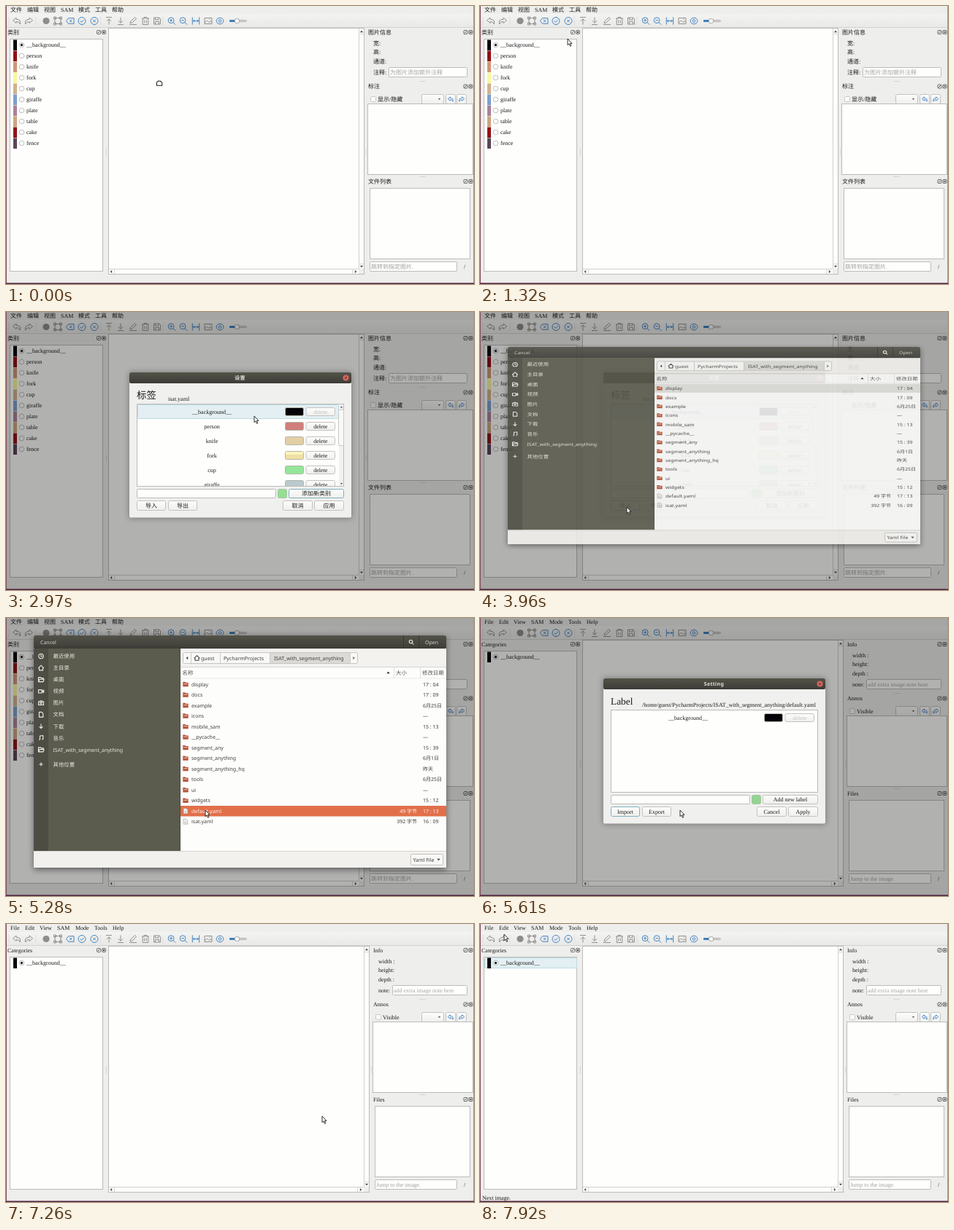
Recreate the animation shown at these times as an HTML page. Size 641x382 px, loop 8000 ms.

```html
<!DOCTYPE html>
<html lang="en">
<head>
<meta charset="utf-8">
<title>Label settings</title>
<style>
  html, body { margin: 0; width: 100%; height: 100%; overflow: hidden; background: #eeeeec; }
  svg { display: block; width: 100vw; height: 100vh; }
  text { font: 8px "Liberation Serif", "Noto Sans CJK SC", "Noto Sans CJK JP", serif; white-space: pre; text-rendering: geometricPrecision; }
  .sans text { font: 7px "Noto Sans", "Noto Sans CJK SC", "Noto Sans CJK JP", sans-serif; }
</style>
</head>
<body>
<svg id="stage" viewBox="0 0 641 382"></svg>
<script>
const STEP = 330, LOOP = 8000;
const INK = '#1c1c1c', LINE = '#bcbcba', GRAY = '#8d8d8b', BLUE = '#3a7fc0';

// Pointer tip for every step.
const POINTER = [
  [210, 106], [210, 106], [210, 106], [210, 106], [120, 45], [14, 5], [16, 40], [18, 72],
  [18, 72], [340, 143], [226, 255], [201, 268], [201, 268], [201, 268], [287, 278], [274, 264],
  [273, 264], [274, 264], [274, 178], [365, 178], [425, 261], [433, 264], [433, 264], [92, 54], [33, 14]
];
const HAND_UNTIL = 4, SETTINGS = [8, 22], CHOOSER = [12, 17], ENGLISH_FROM = 17;
const within = (n, [from, to]) => n >= from && n < to;

const ZH = {
  menu: [['文件', 6], ['编辑', 29], ['视图', 52], ['SAM', 75], ['模式', 99], ['工具', 122], ['帮助', 145]],
  docks: ['类别', '图片信息', '标注', '文件列表'],
  info: ['宽:', '高:', '通道:', '注释:'], note: '为图片添加额外注释', noteX: 524,
  visible: '显示/隐藏', jump: '跳转到指定图片.', shift: 0,
  title: '设置', label: '标签', path: 'isat.yaml', add: '添加新类别',
  buttons: ['导入', '导出', '取消', '应用']
};
const EN = {
  menu: [['File', 6], ['Edit', 26], ['View', 46], ['SAM', 70], ['Mode', 95], ['Tools', 121], ['Help', 146]],
  docks: ['Categories', 'Info', 'Annos', 'Files'],
  info: ['width :', 'height:', 'depth :', 'note:'], note: 'add extra image note here', noteX: 529,
  visible: 'Visible', jump: 'Jump to the image.', shift: 7,
  title: 'Setting', label: 'Label',
  path: '/home/guest/PycharmProjects/ISAT_with_segment_anything/default.yaml', add: 'Add new label',
  buttons: ['Import', 'Export', 'Cancel', 'Apply']
};
const CATEGORIES = [
  ['__background__', '#08060a', '#050308'], ['person', '#8f1016', '#d07f7b'],
  ['knife', '#cf9675', '#e3cfa5'], ['fork', '#f8f89c', '#f0e0a4'],
  ['cup', '#d0b18c', '#93e69a'], ['giraffe', '#7ba0cb', '#b9c9cd'],
  ['plate', '#a98299'], ['table', '#cba57c'], ['cake', '#8f1418'], ['fence', '#5b4557']
];
const PLACES = ['最近使用', '主目录', '桌面', '视频', '图片', '文档', '下载', '音乐', 'ISAT_with_segment_anything', '其他位置'];
const FILES = [
  ['display', '17 : 04'], ['docs', '17 : 09'], ['example', '6月25日'], ['icons', '—'], ['mobile_sam', '15 : 13'],
  ['__pycache__', '—'], ['segment_any', '15 : 39'], ['segment_anything', '6月1日'], ['segment_anything_hq', '昨天'],
  ['tools', '6月25日'], ['ui', '—'], ['widgets', '15 : 12'],
  ['default.yaml', '17 : 13', '49 字节'], ['isat.yaml', '16 : 09', '392 字节']
];

const fill = (x, y, w, h, color, r = 0) =>
  `<rect x="${x}" y="${y}" width="${w}" height="${h}" rx="${r}" fill="${color}"/>`;
const box = (x1, y1, x2, y2, color = '#fefefd', line = LINE, r = 0) =>
  `<rect x="${x1 + .5}" y="${y1 + .5}" width="${x2 - x1 - 1}" height="${y2 - y1 - 1}" rx="${r}" fill="${color}" stroke="${line}"/>`;
const text = (x, y, s, color = INK, anchor = 'start', style = '') =>
  `<text x="${x}" y="${y + 2.7}" fill="${color}" text-anchor="${anchor}" style="${style}">${s}</text>`;
const icon = (d, x, y, color = GRAY, w = 1, inside = 'none', scale = '1') =>
  `<path d="${d}" transform="translate(${x} ${y}) scale(${scale})" fill="${inside}" stroke="${color}" stroke-width="${w}" stroke-linejoin="round"/>`;
const solid = (d, x, y, color, scale) => icon(d, x, y, 'none', 0, color, scale);
const button = (x1, y1, x2, y2, s, color = INK, line = '#c2c2c0') =>
  box(x1, y1, x2, y2, 'url(#button)', line, 2) + text((x1 + x2) / 2, (y1 + y2) / 2, s, color, 'middle');
const ring = r => `M${-r} 0a${r} ${r} 0 1 0 ${2 * r} 0a${r} ${r} 0 1 0 ${-2 * r} 0`;
const TRI = { up: 'M-2.2 1.2L0-1.4L2.2 1.2Z', down: 'M-2.2-1.2L0 1.4L2.2-1.2Z', left: 'M1.2-2.2L-1.4 0L1.2 2.2Z', right: 'M-1.2-2.2L1.4 0L-1.2 2.2Z' };

const ARROW = 'M-1-4.5L-5.5-.8L-1 3V1Q3.5 .8 4.2 4.5Q6.5-2-1-2.2Z';
const LENS = 'M-4.8-.8a3.9 3.9 0 1 0 7.8 0a3.9 3.9 0 1 0-7.8 0M2 2L5.2 5.2M-2.8-.8H1';
const TOOLS = [
  [15, ARROW], [31, ARROW, GRAY, '-1 1'],
  [71, 'M-4-4H4V4H-4ZM-5.5-5.5h3v3h-3zM2.5-5.5h3v3h-3zM-5.5 2.5h3v3h-3zM2.5 2.5h3v3h-3z'],
  [88, 'M-5.5 0L-2.5-3.8H5V3.8H-2.5ZM-1-1.6L2.4 1.6M2.4-1.6L-1 1.6', BLUE],
  [104, ring(5) + 'M-2.4 0L-.6 1.9L2.6-1.7', BLUE],
  [121, ring(5) + 'M-1.8-1.8L1.8 1.8M1.8-1.8L-1.8 1.8', BLUE],
  [141, 'M-4-5H4M0 5V-2.6M-3 .2L0-2.8L3 .2'], [157, 'M-4 5H4M0-5V2.6M-3-.2L0 2.8L3-.2'],
  [174, 'M-4 3L-3.4 .6L2.6-5L4.6-3L-1.4 2.6ZM-5 5H5'],
  [191, 'M-5-3.5H5M-2-3.5V-5H2V-3.5M-3.8-3.5V5H3.8V-3.5M-1.3-1V3M1.3-1V3'],
  [207, 'M-4.5-4.5H3L4.5-3V4.5H-4.5ZM-2.5-4.5V-1.5H2V-4.5M-2.5 4.5V1H2.5V4.5'],
  [227, LENS + 'M-.9-2.7V1.1', BLUE], [243, LENS, BLUE],
  [260, 'M-4.7-5V5M4.7-5V5M-3.5 0H3.5M-1.8-1.8L-3.6 0L-1.8 1.8M1.8-1.8L3.6 0L1.8 1.8', BLUE],
  [277, 'M-5-4H5V4H-5ZM-5 2.5L-1.5-.5L1 2L3 .3L5 2M1.5-2h1.2'],
  [293, 'M-5 0Q-4-4.3 0-4.3T5 0Q4 4.3 0 4.3T-5 0' + ring(1.8).replace('M', 'M'), BLUE]
];

function toolbar() {
  let s = fill(1, 11, 639, 18.5, 'url(#bar)') + fill(1, 29, 639, 1, '#d2d2d0');
  for (const x of [4, 41, 129.5, 215]) s += `<path d="M${x} 15V26" stroke="#cfcfcd" stroke-dasharray="1 1"/>`;
  for (const [x, d, color = GRAY, scale = '1'] of TOOLS) s += icon(d, x, 20.5, color, .95, 'none', scale);
  s += `<circle cx="55" cy="20.5" r="4.6" fill="${GRAY}"/>`;
  return s + box(306, 19, 330, 22, '#dcdcda', '#b0b0ae', 1) + fill(306, 19, 8, 3, BLUE, 1) + box(313, 17, 320, 24, '#f6f6f5', '#a8a8a6', 2);
}

function dockTitle(x, y, s, right) {
  const frame = c => box(c - 3, y - 3, c + 3, y + 3, 'none', '#6a6a68', 1);
  return text(x, y, s) + frame(right - 7) + icon('M-1.3 1.3L1.3-1.3', right - 7, y, INK, .8) +
    frame(right) + icon('M-1.3-1.3L1.3 1.3M1.3-1.3L-1.3 1.3', right, y, INK, .9);
}

function categories(count, hover) {
  let s = box(5, 45, 133, 365);
  if (hover) s += box(6, 46, 133, 61, '#e3eff2', '#bddae1', 1);
  CATEGORIES.slice(0, count).forEach(([name, color], i) => {
    const y = 53.5 + i * 15;
    s += fill(10, y - 7, 5, 14.5, color) +
      `<circle cx="21.5" cy="${y}" r="3.3" fill="#fff" stroke="#aeaeac" stroke-width=".8"/>` +
      (i ? '' : `<circle cx="21.5" cy="${y}" r="1.7" fill="#222"/>`) + text(28, y, name);
  });
  return s;
}

function mainWindow(L, count, hover, status) {
  const d = L.shift, edge = 491 + d, mid = edge - 4;
  let s = fill(0, 0, 641, 382, '#eeeeec') + L.menu.map(([m, x]) => text(x, 5, m)).join('') + toolbar();
  s += dockTitle(2, 36, L.docks[0], 134) + categories(count, hover);
  s += box(140, 30, edge, 369) + fill(edge - 8, 31, 1, 330, '#d0d0ce') + fill(141, 361, edge - 142, 1, '#d0d0ce') +
    fill(edge - 8, 361, 7, 7, '#eeeeec') +
    solid(TRI.up, mid, 35, '#555') + solid(TRI.down, mid, 358, '#555') +
    solid(TRI.left, 144, 365, '#555') + solid(TRI.right, edge - 12, 365, '#555') +
    fill(edge - 8, 38, 7, 1, '#d8d8d6') + fill(edge - 8, 354, 7, 1, '#d8d8d6') +
    fill(148, 362, 1, 6, '#d8d8d6') + fill(edge - 17, 362, 1, 6, '#d8d8d6');
  for (const [x, y, w, h] of [[137, 196, 1, 9], [493 + d, 196, 1, 9], [566, 103, 9, 1], [566, 234, 9, 1]]) s += fill(x, y, w, h, '#d6d6d4');
  [36, 110.5, 241].forEach((y, i) => s += dockTitle(496 + d, y, L.docks[i + 1], 636.5));
  [51, 63.5, 76.5, 91].forEach((y, i) => s += text(503 + d, y, L.info[i]));
  s += box(L.noteX, 84, 632, 98, '#fefefd', LINE, 1) + text(L.noteX + 2, 91, L.note, '#a5a5a3');
  s += box(499 + d, 124, 507 + d, 132, '#fafaf9', '#cacac8', 1) + text(509 + d, 128, L.visible);
  s += button(569, 121, 600, 135, '') + solid(TRI.down, 593.5, 128, '#555', '.8');
  s += button(602, 121, 616, 135, '') + icon(ARROW, 609, 128, BLUE, 1.2, 'none', '.7');
  s += button(617, 121, 631, 135, '') + icon(ARROW, 624, 128, BLUE, 1.2, 'none', '-.7 .7');
  s += box(495 + d, 134, 640, 232) + box(498 + d, 250, 636, 348);
  s += box(498 + d, 351, 618, 365, '#fefefd', LINE, 1) + text(500 + d, 358, L.jump, '#a0a09e') + text(627, 358, '/');
  if (status) s += text(3, 376, status);
  return s;
}

const frameEdge = () => fill(0, 0, 1, 382, '#84515a') + fill(640, 0, 1, 382, '#c08f8c') + fill(0, 380.5, 641, 1.5, '#50213f');
const shade = () => fill(0, 0, 641, 382, 'rgba(0,0,0,.305)');

function settings(L, count, hover, importFocus) {
  const wide = count > 1, x = wide ? 382 : 389, focus = '#7fb0bd';
  let s = `<rect x="169" y="83" width="304" height="200" fill="#000" opacity=".35" filter="url(#soft)"/>` +
    fill(169, 83, 304, 199.5, '#f0f0ee', 2) + fill(169, 83, 304, 15, 'url(#dark)', 2) +
    `<g class="sans">${text(320.5, 90.5, L.title, '#e4e2da', 'middle', 'font-weight:600;letter-spacing:.3px')}</g>` +
    `<circle cx="465.5" cy="90.5" r="4" fill="#d9655c"/>` + icon('M-1.5-1.5L1.5 1.5M1.5-1.5L-1.5 1.5', 465.5, 90.5, '#4a2a28', .9);
  s += text(179, 116, L.label, INK, 'start', 'font-size:13.4px') + text(222, 119, L.path);
  s += box(179, 126, 463, 240) + '<g clip-path="url(#rows)">';
  if (hover) s += box(180, 127, 456, 147, '#e3eff2', '#bddae1', 1);
  CATEGORIES.slice(0, Math.min(count, 6)).forEach(([name, , color], i) => {
    const y = 137 + i * 20;
    s += text(wide ? 282 : 285, y, name, INK, 'middle') + box(x, y - 6, x + 26, y + 6, color, '#b5b5ac', 2) +
      button(x + 28.5, y - 6, x + 69, y + 6, 'delete', i ? INK : '#c4c4c2');
    if (i === 3) s += fill(x + 1, y - 5, 24, 4, '#faf3ba');
  });
  s += '</g>';
  if (wide) s += fill(456, 127, 6, 112, '#f1f1ef') + box(455, 134, 463, 184, '#f8f8f7', '#c8c8c6', 1) +
    solid(TRI.up, 459.5, 130.5, '#555', '.8') + solid(TRI.down, 459.5, 236, '#555', '.8');
  s += box(179, 243, 370, 256, '#fefefd', LINE, 1) + box(372, 243, 385, 256, wide ? '#93e093' : '#93d493', '#a9c4a5', 2);
  s += button(387, 243, 463, 256, L.add, INK, importFocus ? undefined : focus);
  [[179, 219], [222, 262], [379, 420], [422, 463]].forEach(([a, b], i) =>
    s += button(a, 259, b, 273, L.buttons[i], INK, importFocus && !i ? focus : undefined));
  return s;
}

const PLACE_ICONS = [
  ring(3.2) + 'M0-2V.3H1.8', 'M-3.8 .3L0-3.4L3.8 .3M-2.5 0V3.3H2.5V0', 'M-3.5 3V-3H-.5L.3-2H3.2V0M-3.5 3L-2-.3H4L3 3Z',
  'M-3.5-2H1.2V2.3H-3.5ZM1.5 0L3.7-1.6V1.8Z', 'M-3.5-2H-1.5L-1-3H1L1.5-2H3.5V2.8H-3.5Z' + ring(1.3),
  'M-2.6-3.4H1L2.8-1.6V3.4H-2.6Z', 'M0-3.2V2.6M-2.4 .3L0 2.8L2.4 .3', 'M-1.5 2.2V-2.8L2.8-3.3V1.6M-3 2.4h1.5M1.3 1.8h1.5',
  'M-3.5 3V-3H-.5L.3-2H3.2V0M-3.5 3L-2-.3H4L3 3Z', 'M-2.6 0H2.6M0-2.6V2.6'
];

function chooser(selected, opening) {
  const cjk = 'font-size:7.4px', dim = '#55554f';
  const pose = opening ? 'opacity=".88" transform="translate(0 183.5) scale(1 .85) translate(0 -183.5)"' : '';
  let s = `<g class="sans" ${pose}>` +
    `<rect x="38" y="26" width="565" height="320" fill="#000" opacity=".45" filter="url(#soft)"/>` +
    fill(38, 24, 565, 319, '#fdfdfc', 2) + fill(38, 24, 565, 18.5, 'url(#dark)', 2) +
    text(47, 33, 'Cancel', '#d5d3ca') + text(574, 33, 'Open', '#d5d3ca') +
    icon(ring(2.2) + 'M1.6 1.6L3.8 3.8', 554.5, 32.5, '#e4e2da', 1.2) + fill(544, 24, 1, 18, '#36352f') + fill(565, 24, 1, 18, '#36352f');
  s += fill(38, 42, 200, 278, '#5b5b4e') + fill(38, 42, 20, 278, '#4d4d43');
  PLACES.forEach((name, i) => {
    const y = i === 9 ? 201 : 52.5 + i * 16.05;
    s += icon(PLACE_ICONS[i], 48, y, '#efefe9', 1.1) + text(64.5, y, name, '#e9e9e2', 'start', i === 8 ? '' : cjk);
  });
  s += fill(238, 42, 365, 25, '#f3f2ef') + box(242, 47, 482, 63, '#f8f8f6', '#c6c5c0', 2) + fill(361, 48, 110, 14, '#dbdad6');
  for (const x of [253, 293, 361, 471]) s += fill(x, 48, 1, 14, '#cccbc6');
  s += solid(TRI.left, 248, 55, '#444') + solid(TRI.right, 476.5, 55, '#777') + icon(PLACE_ICONS[1], 261.5, 55, '#444', 1.1);
  s += text(267, 55, 'guest', '#3f3f3b') + text(298, 55, 'PycharmProjects', '#3f3f3b') + text(367, 55, 'ISAT_with_segment_anything', '#3f3f3b');
  s += fill(238, 67, 365, 1, '#d6d5d1') + fill(238, 82.5, 365, .7, '#e2e1de') + fill(531, 68, 1, 15, '#e0dfdc') + fill(567, 68, 1, 15, '#e0dfdc');
  s += text(241.5, 75, '名称', dim, 'start', cjk) + solid(TRI.up, 523.5, 75, '#333') + text(534, 75, '大小', dim, 'start', cjk) + text(570, 75, '修改日期', dim, 'start', cjk);
  if (opening) s += fill(238, 84, 365, 14, '#dededa');
  FILES.forEach(([name, when, size], i) => {
    const y = 91 + i * 14.52, on = i === selected, ink = on ? '#fff4ee' : '#3f3f3b';
    if (on) s += fill(238, y - 7.2, 365, 14.5, '#e1704a');
    s += size ? icon('M-2.8-3.5H1L2.8-1.7V3.5H-2.8ZM-1.3 0H1.3M-1.3 1.7H1.3', 246, y, '#a5a5a0', .7, '#f6f6f3')
      : solid('M-3.7 3.2V-3.2H-.6L.2-2.2H3.7V3.2Z', 246, y, '#b9543a') + fill(243.5, y - .9, 5, 1, '#efc9b8');
    s += text(254, y, name, ink) + text(571, y, when, ink);
    if (size) s += text(563, y, size, ink, 'end');
  });
  return s + fill(238, 42, 1, 278, '#4a4a42') + fill(38, 320, 565, 23, '#f2f1ee') + fill(38, 320, 565, 1, '#d4d3cf') +
    box(554, 324, 599, 340, '#f8f8f6', '#c2c1bc', 2) + text(557.5, 332, 'Yaml File', '#3f3f3b') + solid(TRI.down, 592.5, 332, '#444') + '</g>';
}

function pointer(n) {
  const [x, y] = POINTER[n];
  return n < HAND_UNTIL
    ? icon('M-3.6 3.2V-.6Q-3.4-1.8-2.4-1.8Q-2-3.2-.7-2.8Q.4-3.4 1.2-2.6Q2.4-2.8 2.7-1.5Q3.8-1.2 3.7 0V3.2Z', x, y, '#222', 1.1, '#fff')
    : icon('M0 0V8.6L1.9 6.9L3.5 10.3L4.9 9.7L3.4 6.4H6Z', x, y, '#1a1a1a', .9, '#fff');
}

const gradient = (id, a, b) => `<linearGradient id="${id}" x2="0" y2="1"><stop stop-color="${a}"/><stop offset="1" stop-color="${b}"/></linearGradient>`;
const DEFS = '<defs>' + gradient('bar', '#f3f3f1', '#e9e9e7') + gradient('button', '#fdfdfc', '#efefed') + gradient('dark', '#545349', '#3c3b36') +
  '<clipPath id="rows"><path d="M180 127H462V239H180Z"/></clipPath><filter id="soft" x="-10%" y="-10%" width="120%" height="120%"><feGaussianBlur stdDeviation="4"/></filter></defs>';

function scene(n) {
  const english = n >= ENGLISH_FROM, L = english ? EN : ZH, count = english ? 1 : CATEGORIES.length;
  let s = DEFS + mainWindow(L, count, n === 7 || n >= 23, n === 24 ? 'Next image.' : '');
  if (within(n, SETTINGS)) s += shade() + settings(L, count, n > 8 && !english, n >= 11);
  if (within(n, CHOOSER)) s += (n === 12 ? fill(169, 83, 304, 200, 'rgba(0,0,0,.3)') : '') + chooser(n === 16 ? 12 : -1, n === 12);
  return s + frameEdge() + pointer(n);
}

const stage = document.getElementById('stage');
let shown = -1;
function tick() {
  const n = Math.floor(performance.now() % LOOP / STEP);
  if (n !== shown) stage.innerHTML = scene(shown = n);
  requestAnimationFrame(tick);
}
tick();
</script>
</body>
</html>
```
